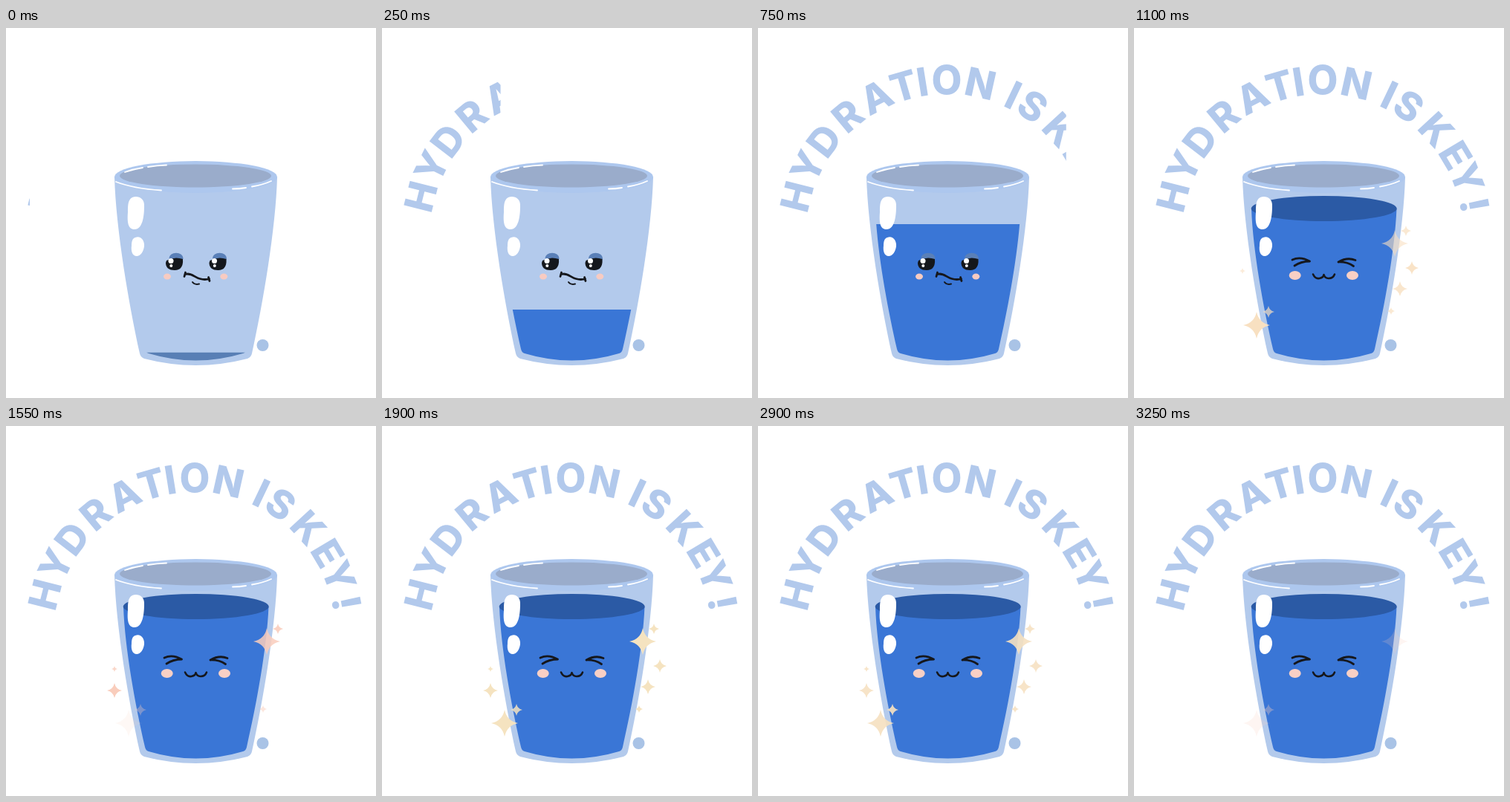
An HTML page for the animation above (3300 ms loop, 498 px wide and 498 px high).

```html
<!DOCTYPE html>
<html lang="en">
<head>
<meta charset="utf-8">
<title>Hydration is key</title>
<style>
  html, body { margin: 0; width: 100%; height: 100%; overflow: hidden; background: #fff; }
  svg { display: block; width: 498px; height: 498px; }
  #words text { font: 800 53px Inter, "Open Sans", sans-serif; fill: #b2c9ec; text-anchor: middle; }
  .line { fill: none; stroke: #15171c; stroke-linecap: round; stroke-linejoin: round; }
  .shine { fill: none; stroke: #fff; stroke-width: 1.8; stroke-linecap: round; }
</style>
</head>
<body>
<svg viewBox="0 0 498 498">
  <defs>
    <clipPath id="wipeX"><rect id="wordBox" x="0" y="0" width="0" height="498"/></clipPath>
    <clipPath id="wipeY"><rect id="waterBox" x="0" y="0" width="498" height="498"/></clipPath>
  </defs>

  <g id="words" clip-path="url(#wipeX)"></g>

  <!-- glass -->
  <path fill="#b3caec" d="M146 201C148 270 165 370 180 438Q181 443 186 445Q255.500 463 325 445Q330 443 331 438C346 370 363 270 365 201Z"/>
  <ellipse cx="255.500" cy="200.500" rx="109.500" ry="21.500" fill="#adc7ee"/>
  <ellipse cx="255" cy="199" rx="102" ry="15.500" fill="#9aaccb"/>

  <!-- water -->
  <g clip-path="url(#wipeY)">
    <path id="water" d="M158 243C160 300 174 375 187 432Q188 437 192 438Q255.500 457 319 438Q323 437 324 432C337 375 351 300 353.500 243Z"/>
    <ellipse cx="255.700" cy="243" rx="98" ry="17" fill="#2b5aa5"/>
  </g>

  <!-- reflections -->
  <path class="shine" d="M160 194Q171 190 184 188M191 187Q203 185 216 184.500M148 207Q171 216 209 218.500M305 216.500Q315 216.500 323 215M331 213.500Q346 211 357 206"/>
  <path fill="#fff" d="M170 228C177 225 187 229 186 240C186 253 184 271 173 271C164 271 163 261 164 248C164 239 164 231 170 228Z"/>
  <path fill="#fff" d="M174 282C181 279 187 286 186 294C185 301 181 307 176 307C170 307 168 300 169 293C169 288 170 283 174 282Z"/>

  <g id="calm">
    <g id="eye">
      <ellipse cx="229" cy="310" rx="9.500" ry="7.300" fill="#5a80b8"/>
      <path fill="#14171c" d="M216 313Q227 307 238 311Q239 326 227 326Q215 326 215 316Z"/>
      <circle cx="222" cy="313.500" r="3.500" fill="#fff"/>
      <circle cx="222.300" cy="320" r="2" fill="#fff"/>
    </g>
    <use href="#eye" x="58.500"/>
    <g fill="#f7cbc2">
      <ellipse cx="217" cy="334.500" rx="5" ry="4"/>
      <ellipse cx="293.300" cy="334.500" rx="5" ry="4"/>
    </g>
    <path class="line" stroke-width="2.800" d="M241 331.500C250 329 254 336 261 337.500Q268 339.500 273.500 337.500M241.500 329L240 334.500M272.500 335.500L274 340.500"/>
    <path class="line" stroke-width="2" d="M251 342Q254 346 260 344.500"/>
  </g>

  <g id="happy">
    <path class="line" stroke-width="2.800" d="M213 312Q224 307 236.500 314Q225 314 216 320M298 312.500Q287 308 275 315Q287 314.500 295.500 320.500"/>
    <path class="line" stroke-width="2.600" d="M241 331.500Q244 338 249.500 337Q255 336 255.500 332Q257 337 262 337Q268 337 270 331.500"/>
    <g fill="#f9d0c5">
      <ellipse cx="216.700" cy="333" rx="8" ry="6"/>
      <ellipse cx="294" cy="333" rx="8" ry="6"/>
    </g>
  </g>

  <g id="sparks"></g>
  <circle cx="345.500" cy="427" r="8" fill="#a9c3e6"/>
</svg>

<script>
const LOOP = 3300, STEP = 50, SMILE_AT = 900;
const $ = id => document.getElementById(id);
const clamp = v => Math.min(1, Math.max(0, v));

function add(parent, tag, attrs) {
  const el = document.createElementNS("http://www.w3.org/2000/svg", tag);
  for (const key in attrs) el.setAttribute(key, attrs[key]);
  return parent.appendChild(el);
}

// Letters stand on a circle; angles are degrees from its top.
const angles = [-75.8, -64, -52.5, -39.8, -27.1, -16.1, -9.1, 0, 12.6, 25.5, 33.8, 47.3, 59.2, 68.7, 79];
[..."HYDRATIONISKEY!"].forEach((letter, i) => {
  add($("words"), "text", { x: 254, y: 89, transform: `rotate(${angles[i]} 254 278)` }).textContent = letter;
});

// Sparkles: x, y, radius, then opacity at the five uneven moments of the twinkle.
const sparks = [
  [351, 290, 18, .6, .85, 1, 0, .2],
  [366, 273, 7, .7, .9, 1, 0, 0],
  [374, 323, 9, .9, 0, 1, 0, 0],
  [358, 351, 10, .8, 0, 1, 0, 0],
  [346, 381, 5, .7, .5, 1, 0, 0],
  [181, 382, 8, .7, .35, .85, .2, .35],
  [165, 400, 18, 1, .15, 1, .1, .2],
  [146, 356, 10, 0, 1, 1, 0, 0],
  [146, 327, 4, .6, .8, .9, 0, 0]
].map(([x, y, r, a, b, c, d, e]) => {
  const k = r * .17;
  const el = add($("sparks"), "path", {
    d: `M0 ${-r}Q${k} ${-k} ${r} 0Q${k} ${k} 0 ${r}Q${-k} ${k} ${-r} 0Q${-k} ${-k} 0 ${-r}Z`,
    transform: `translate(${x} ${y})`
  });
  return { el, glow: [0, a, 1, b, c, 1, d, 1, 1, e] };
});
const times = [850, 1100, 1200, 1550, 1900, 2050, 2450, 2700, 2850, 3250];

const cream = [245, 227, 192], peach = [248, 224, 193], pink = [249, 205, 188];
const tints = [peach, peach, peach, pink, cream, cream, pink, cream, cream, pink];

const mix = (a, b, f) => a + (b - a) * f;
const blend = (a, b, f) => `rgb(${a.map((v, i) => Math.round(mix(v, b[i], f)))})`;

function segment(t) {
  let i = 0;
  while (i < times.length - 2 && t >= times[i + 1]) i++;
  return [i, clamp((t - times[i]) / (times[i + 1] - times[i]))];
}

function draw(t) {
  const p = clamp((t + 45) / 960);
  $("wordBox").setAttribute("width", 9 + 490 * p);
  $("waterBox").setAttribute("y", 447 - 221 * p);
  $("water").setAttribute("fill", blend([88, 127, 181], [58, 118, 214], clamp(t / 100)));

  const smiling = t >= SMILE_AT;
  $("calm").style.display = smiling ? "none" : "";
  $("happy").style.display = smiling ? "" : "none";

  const [i, f] = segment(t);
  const tint = blend(tints[i], tints[i + 1], f);
  for (const { el, glow } of sparks) {
    el.setAttribute("fill", tint);
    el.setAttribute("opacity", mix(glow[i], glow[i + 1], f));
  }
}

const start = performance.now();
function tick() {
  const t = (performance.now() - start) % LOOP;
  draw(Math.floor(t / STEP) * STEP);
  requestAnimationFrame(tick);
}
tick();
</script>
</body>
</html>
```
